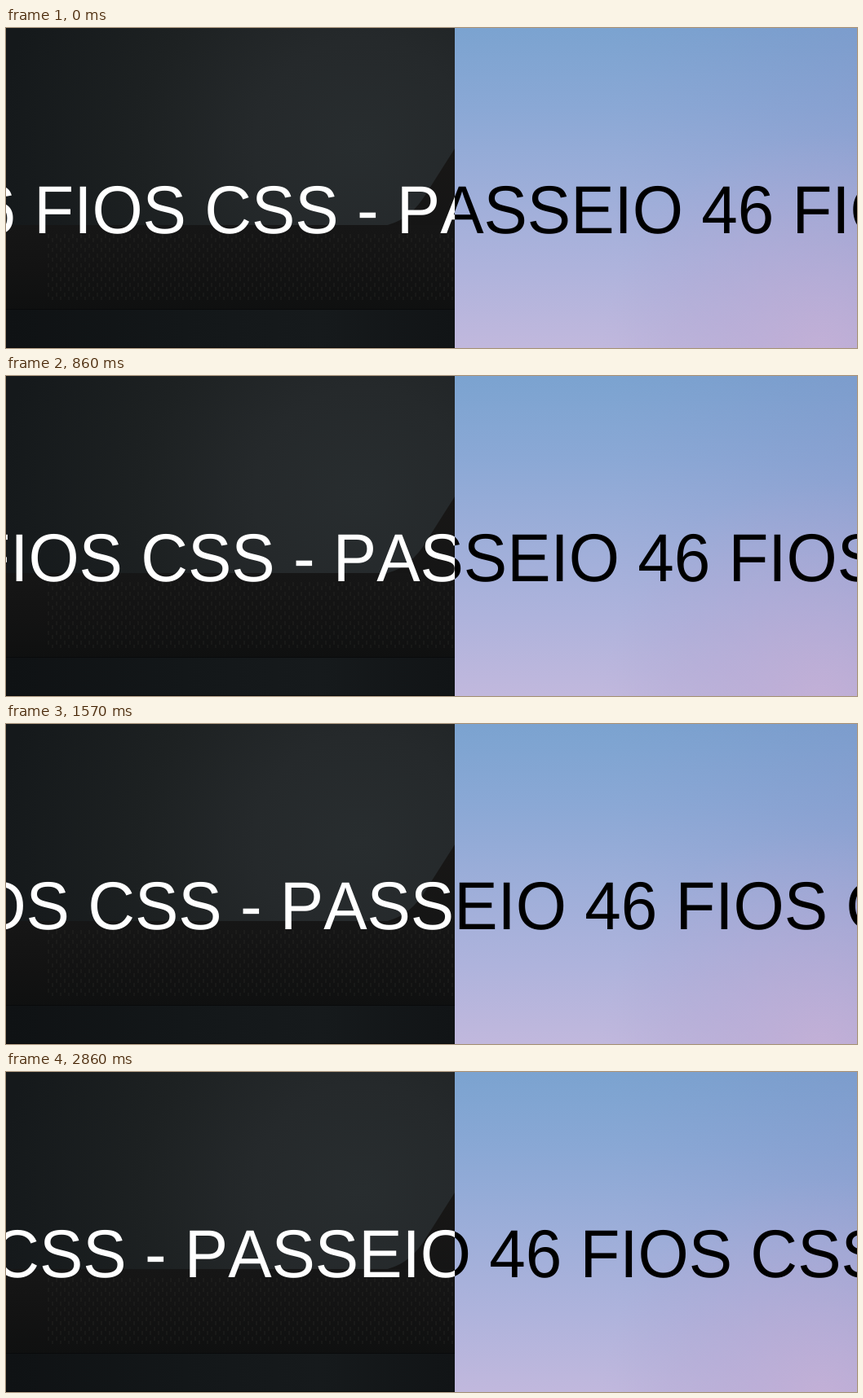
An HTML page that plays this animation: 1043x393 px, repeating every 2.96 s.

```html
<!DOCTYPE html>
<html lang="pt">
<head>
<meta charset="utf-8">
<title>Letreiro</title>
<style>
  html, body { margin: 0; width: 100%; height: 100%; overflow: hidden; background: #111; }
  svg { display: block; width: 1043px; height: 393px; }
  text {
    font: 80px "Liberation Sans", Arial, sans-serif;
    font-kerning: none;
    text-rendering: geometricPrecision;
    white-space: pre;
  }
</style>
</head>
<body>
<svg viewBox="0 0 1043 393">
  <defs>
    <clipPath id="leftHalf"><rect width="550" height="393"/></clipPath>
    <clipPath id="rightHalf"><rect x="550" width="493" height="393"/></clipPath>

    <radialGradient id="wall" gradientUnits="userSpaceOnUse" cx="435" cy="145" r="440">
      <stop offset="0" stop-color="#282d2f"/>
      <stop offset=".3" stop-color="#25292b"/>
      <stop offset=".6" stop-color="#1d2122"/>
      <stop offset="1" stop-color="#15191b"/>
    </radialGradient>
    <linearGradient id="band" x2="0" y2="1">
      <stop offset="0" stop-color="#161616"/>
      <stop offset=".5" stop-color="#131313"/>
      <stop offset="1" stop-color="#0f1010"/>
    </linearGradient>
    <linearGradient id="bump" x2="0" y2="1">
      <stop offset="0" stop-color="#181716"/>
      <stop offset="1" stop-color="#151515"/>
    </linearGradient>
    <linearGradient id="floor">
      <stop offset="0" stop-color="#0f1214"/>
      <stop offset=".4" stop-color="#131719"/>
      <stop offset=".7" stop-color="#161a1c"/>
      <stop offset="1" stop-color="#111416"/>
    </linearGradient>
    <pattern id="weave" width="10" height="12" patternUnits="userSpaceOnUse">
      <path d="M2 1v5M7 6v5" stroke="#262524" stroke-width="1" opacity=".7"/>
    </pattern>

    <linearGradient id="sky" x2="0" y2="1">
      <stop offset="0" stop-color="#7ba3d0"/>
      <stop offset=".25" stop-color="#8aa8d5"/>
      <stop offset=".5" stop-color="#9daed9"/>
      <stop offset=".75" stop-color="#aeb3dc"/>
      <stop offset="1" stop-color="#c1b8dd"/>
    </linearGradient>
    <linearGradient id="shade">
      <stop offset=".4" stop-color="#8084c0" stop-opacity="0"/>
      <stop offset="1" stop-color="#8084c0" stop-opacity=".2"/>
    </linearGradient>
    <radialGradient id="glow" gradientUnits="userSpaceOnUse" cx="1000" cy="400" r="270">
      <stop offset="0" stop-color="#c6b0d6" stop-opacity=".8"/>
      <stop offset=".4" stop-color="#bdacd5" stop-opacity=".5"/>
      <stop offset="1" stop-color="#b0a8d4" stop-opacity="0"/>
    </radialGradient>
  </defs>

  <g clip-path="url(#leftHalf)">
    <rect width="550" height="393" fill="url(#wall)"/>
    <path d="M462 243Q492 238 512 208L550 148V243Z" fill="url(#bump)"/>
    <rect y="242" width="550" height="104" fill="url(#band)"/>
    <rect x="50" y="252" width="500" height="82" fill="url(#weave)"/>
    <rect y="345" width="550" height="48" fill="url(#floor)"/>
    <path d="M0 345.5H550M0 392.5H550" stroke="#090a0b"/>
    <text fill="#fff"/>
  </g>
  <g clip-path="url(#rightHalf)">
    <rect x="550" width="493" height="393" fill="url(#sky)"/>
    <rect x="550" width="493" height="393" fill="url(#shade)"/>
    <rect x="550" width="493" height="393" fill="url(#glow)"/>
    <text/>
  </g>
</svg>
<script>
  const LOOP = 2960;
  const STEP = 13;        // pixels per tick
  const START = -450.4;   // left edge of the first phrase
  const BASELINE = 252;
  const TALL = 1.04;      // taller capitals, natural widths
  const lines = document.querySelectorAll("text");
  lines.forEach(line => line.textContent = "PASSEIO 46 FIOS CSS - ".repeat(3));

  // Ticks fall at 0, 130 and 280 ms of every 430 ms.
  function ticksAt(t) {
    const rest = t % 430;
    return Math.floor(t / 430) * 3 + (rest >= 130) + (rest >= 280);
  }

  function draw(t) {
    const x = START - STEP * ticksAt(t);
    const place = `translate(${x} ${BASELINE}) scale(1 ${TALL})`;
    lines.forEach(line => line.setAttribute("transform", place));
  }

  const begin = performance.now();
  function frame() {
    draw((performance.now() - begin) % LOOP);
    requestAnimationFrame(frame);
  }
  frame();
</script>
</body>
</html>
```
